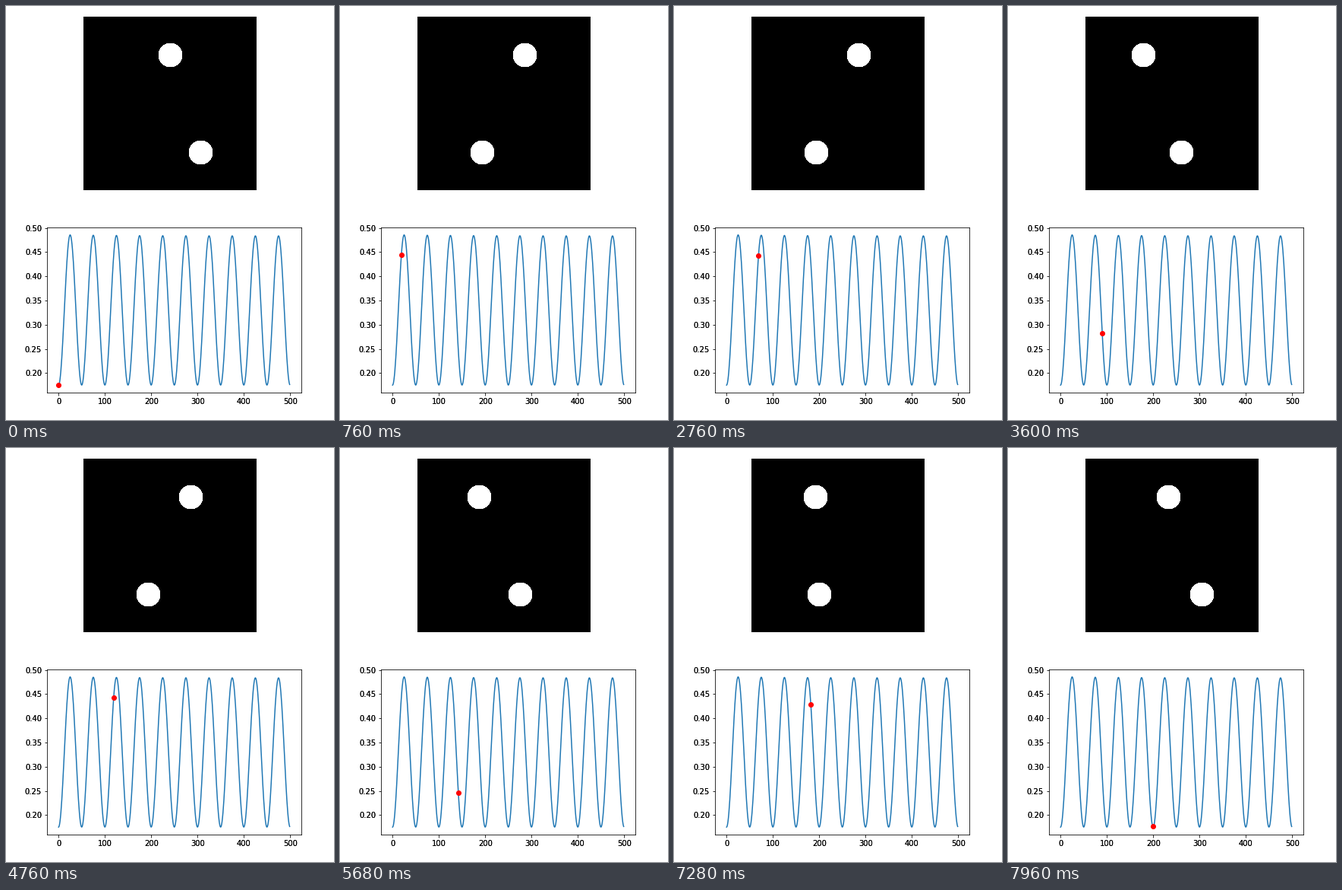
A matplotlib script that plays this animation: 432x544 px, repeating every 8000 ms.

```python
import numpy as np
import matplotlib.pyplot as plt
from matplotlib.animation import FuncAnimation

plt.rcParams["font.family"] = "DejaVu Sans"

W, H, DPI = 432, 544, 72
FRAMES, STEP_MS = 200, 40
PERIOD, SWING = 50, 40
SIDE, RADIUS = 228, 16

fig = plt.figure(figsize=(W / DPI, H / DPI), dpi=DPI, facecolor="white")

# Black field with two discs moving on whole pixels
rows, cols = np.mgrid[:SIDE, :SIDE]


def disc(cx, cy):
    return (cols - cx) ** 2 + (rows - cy) ** 2 < RADIUS ** 2


def field(n):
    angle = 2 * np.pi * (n % PERIOD) / PERIOD
    mid = SIDE // 2
    top = mid + int(SWING * np.sin(angle))
    low = mid + int(SWING * np.cos(angle))
    mask = disc(top, mid - 64) | disc(low, mid + 64)
    return np.repeat((mask * 255).astype(np.uint8)[:, :, None], 3, axis=2)


picture = fig.figimage(field(0), 102, H - 242, origin="upper")

# Oscillating curve
n = np.arange(500)
low = 0.1752
peak = 0.4835 + 0.0025 * np.exp(-n / 120)
curve = low + (peak - low) * (1 - np.cos(2 * np.pi * n / PERIOD)) / 2

ax = fig.add_axes([0.125, 36 / H, 0.775, 217.44 / H], facecolor="white")
ax.plot(n, curve, color="#1f77b4", lw=1.5)
dot, = ax.plot([0], [curve[0]], "o", color="red", ms=6)
ax.set_xlim(-24.95, 523.95)
ax.set_ylim(0.1597, 0.5015)

xticks = np.arange(0, 501, 100)
yticks = np.arange(0.20, 0.501, 0.05)
ax.set_xticks(xticks, [""] * len(xticks))
ax.set_yticks(yticks, [""] * len(yticks))


def label(text, xy, coords, shift, ha, va):
    # drawn twice for the heavy lettering
    for _ in range(2):
        ax.annotate(text, xy, xycoords=coords, xytext=shift,
                    textcoords="offset points", ha=ha, va=va,
                    fontsize=10, annotation_clip=False)


for x in xticks:
    label(str(x), (x, 0), ax.get_xaxis_transform(), (0, -7), "center", "top")
for y in yticks:
    label(f"{y:.2f}", (0, y), ax.get_yaxis_transform(), (-7, 0),
          "right", "center_baseline")


def update(i):
    picture.set_data(field(i))
    dot.set_data([i], [curve[i]])
    return picture, dot


anim = FuncAnimation(fig, update, frames=FRAMES, interval=STEP_MS,
                     init_func=lambda: update(0), repeat=True,
                     repeat_delay=0, blit=False)
plt.show()
```
